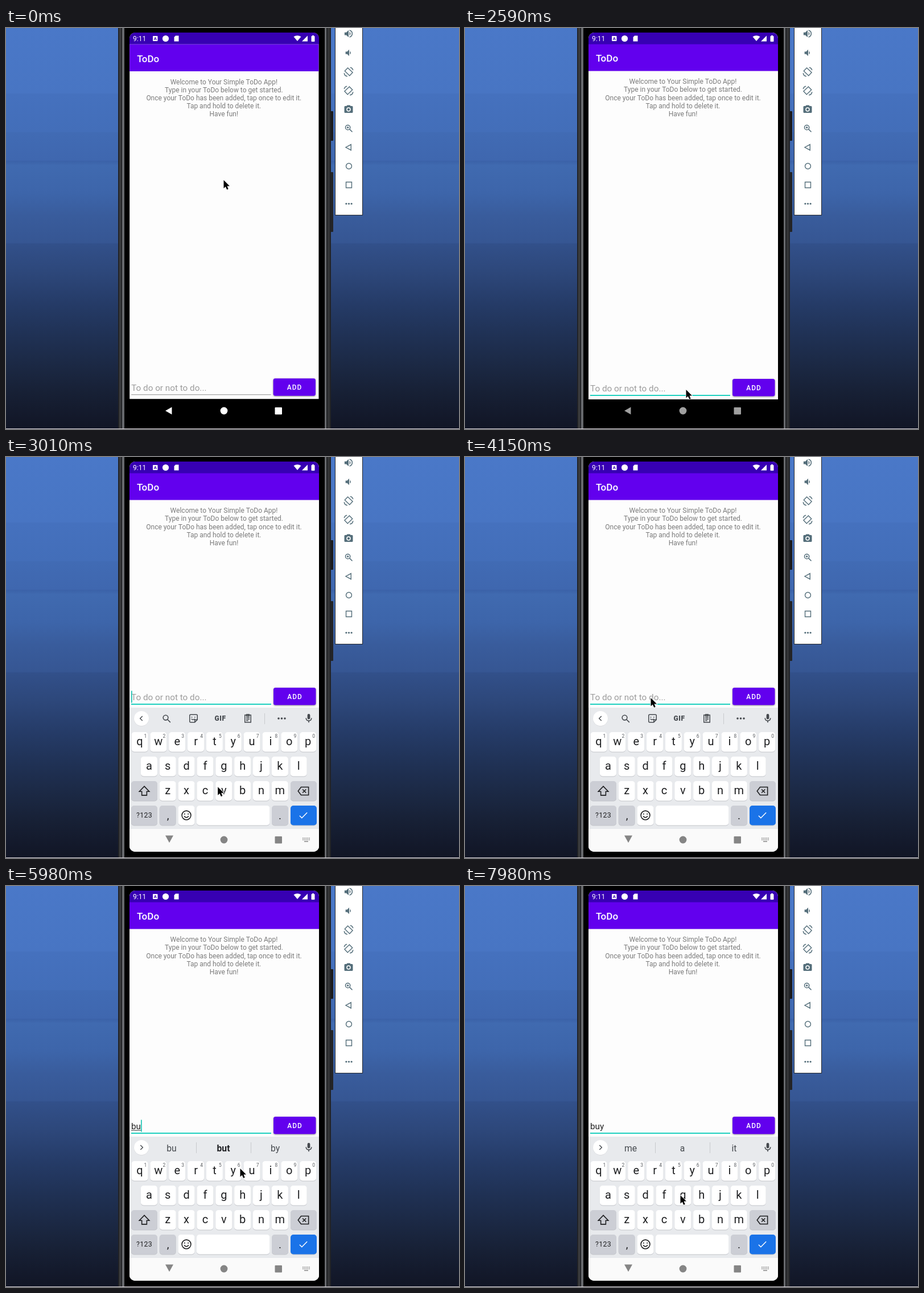
Recreate the animation shown at these times as an HTML page with a canvas. Size 796 by 704 pixels, loop 8000 ms.

```html
<!DOCTYPE html>
<html lang="en">
<head>
<meta charset="utf-8">
<title>ToDo app</title>
<style>
html, body { margin: 0; width: 100%; height: 100%; overflow: hidden; background: #111626 }
canvas { display: block }
</style>
</head>
<body>
<canvas id="stage" width="796" height="704"></canvas>
<script>
const ctx = document.getElementById('stage').getContext('2d');
const LOOP = 8000;

const bursts = [
  [120, 270, 2], [540, 1230, 5], [1380, 1500, 2], [1650, 2190, 5], [2590, 2860, 3],
  [3010, 3430, 4], [3720, 3720, 1], [4150, 4150, 1], [4420, 5410, 8], [5560, 5980, 4],
  [6130, 6550, 4], [6670, 7120, 4], [7380, 7680, 3], [7830, 7980, 2]
];
// Pointer tip: [time, x, y]
const pointer = [
  [270, 382, 266], [1230, 373, 366], [1500, 368, 486], [2190, 388, 634], [2860, 388, 634],
  [3430, 326, 422], [4280, 326, 422], [5130, 411, 588], [5410, 411, 574], [5840, 424, 500],
  [5980, 411, 495], [6130, 400, 494], [6550, 400, 496], [7120, 415, 631], [7380, 414, 630],
  [7680, 384, 560], [7980, 378, 542]
];
// Typing: [time, text, suggestions, word still being composed, autocorrect shown]
const typing = [
  [2650, ''],
  [5260, 'b', ['b', 'but', 'by'], true, true],
  [5840, 'bu', ['bu', 'but', 'by'], true, true],
  [6400, 'buy', ['buy', 'but', 'buying'], true],
  [7380, 'buy ', ['me', 'a', 'it']]
];
const sky = [
  [0, '#4a78c8'], [114, '#4875c3'], [116, '#4571be'], [182, '#436eb9'], [184, '#416bb4'],
  [232, '#3f67af'], [234, '#3b62a8'], [241, '#406ab0'], [290, '#3d65aa'], [330, '#395c9c'],
  [377, '#365693'], [379, '#32508a'], [430, '#2d477a'], [485, '#253b67'], [535, '#203256'],
  [595, '#1b2843'], [640, '#172035'], [704, '#111525']
];

function burstTime(t) {
  let now = 0;
  for (const [a, b, n] of bursts) {
    if (t < a) break;
    const gap = (b - a) / (n - 1);
    now = t >= b ? b : a + Math.floor((t - a) / gap) * gap;
  }
  return now;
}

// Interpolates rows of [time, ...values]
function at(rows, t) {
  const i = rows.findIndex(r => r[0] >= t);
  if (i < 0) return rows[rows.length - 1].slice(1);
  if (i === 0) return rows[0].slice(1);
  const a = rows[i - 1], b = rows[i], p = (t - a[0]) / (b[0] - a[0]);
  return a.slice(1).map((v, k) => v + (b[k + 1] - v) * p);
}

function rect(x, y, w, h, color, r = 0) {
  ctx.fillStyle = color;
  ctx.beginPath();
  ctx.roundRect(x, y, w, h, r);
  ctx.fill();
}

function disc(x, y, r, color) {
  ctx.fillStyle = color;
  ctx.beginPath();
  ctx.arc(x, y, r, 0, 7);
  ctx.fill();
}

function text(s, x, y, size, color, align = 'center', weight = 400, spacing = 0) {
  ctx.font = `${weight} ${size}px Roboto, sans-serif`;
  ctx.letterSpacing = spacing + 'px';
  ctx.textAlign = align;
  ctx.fillStyle = color;
  ctx.fillText(s, x, y);
}

// Path drawn in a 24-unit box centred on x, y; filled unless a line width is given
function icon(d, x, y, size, color, line) {
  const path = new Path2D(d);
  ctx.save();
  ctx.translate(x - size / 2, y - size / 2);
  ctx.scale(size / 24, size / 24);
  ctx.fillStyle = ctx.strokeStyle = color;
  ctx.lineWidth = line;
  if (line) ctx.stroke(path);
  else ctx.fill(path, 'evenodd');
  ctx.restore();
}

const LENS = 'M15 9.5A5.5 5.5 0 1 1 4 9.5A5.5 5.5 0 1 1 15 9.5M13.5 13.5L20 20';
const SPEAKER = 'M3 9v6h4l5 5V4L7 9z';
const WAVE = 'M14 8c3 1.4 3 6.6 0 8z';
const ROTATE = 'M10 2L22 13.5L14.5 21.5L2.5 10zM1 15a9 9 0 0 0 8 8M16 1a9 9 0 0 1 7 7';
const CAMERA = 'M9 2L7 4H4a2 2 0 0 0-2 2v12a2 2 0 0 0 2 2h16a2 2 0 0 0 2-2V6a2 2 0 0 0-2-2h-3L15 2z' +
  'M17 12A5 5 0 1 1 7 12A5 5 0 1 1 17 12M15 12A3 3 0 1 0 9 12A3 3 0 1 0 15 12';
const SMILE = 'M22 12A10 10 0 1 1 2 12A10 10 0 1 1 22 12M7 14q5 6 10 0M8 8v2.5M16 8v2.5';
const STICKER = 'M5 3h14a2 2 0 0 1 2 2v10l-6 6H5a2 2 0 0 1-2-2V5a2 2 0 0 1 2-2M21 15h-6v6M8 8v2M15 8v2M7 13q4 4 8 0';
const CLIPBOARD = 'M5 4h14v17H5zM9 2.5h6v4H9zM8 10h8M8 13.5h8M8 17h5';
const MIC = 'M12 2a3 3 0 0 1 3 3v6a3 3 0 0 1-6 0V5a3 3 0 0 1 3-3zM5 11h2a5 5 0 0 0 10 0h2a7 7 0 0 1-6 7v3h-2v-3a7 7 0 0 1-6-7z';
const SHIFT = 'M12 3L22 13.5H17V21H7V13.5H2z';
const ERASE = 'M8 4H23V20H8L2 12zM11 8.5L18 15.5M18 8.5L11 15.5';

function dots(x, y, r, gap, color) {
  for (let i = -1; i < 2; i++) disc(x + i * gap, y, r, color);
}

function drawDesktop() {
  const fill = ctx.createLinearGradient(0, 0, 0, 704);
  for (const [y, c] of sky) fill.addColorStop(y / 704, c);
  rect(0, 0, 796, 704, fill);

  rect(570, 146, 5, 52, '#1b1b1d', 1);
  rect(570, 253, 5, 105, '#242426', 1);
  rect(197, 0, 374, 704, '#222326');
  rect(199, 0, 3, 704, '#3c3d3f');
  rect(204, 0, 4, 704, '#67696d');
  rect(208, 0, 352, 704, '#000');
  rect(560, 0, 3, 704, '#67696d');
  rect(565, 0, 4, 704, '#333436');

  rect(578, -2, 49, 331, '#26282c');
  rect(579, -2, 47, 330, '#fff');
  const c = '#546e7a';
  icon(SPEAKER + WAVE, 602, 10, 19, c);
  icon('M14 4.5c8 2 8 13 0 15', 602, 10, 19, c, 2);
  icon(SPEAKER + WAVE, 603, 43.5, 17, c);
  icon(ROTATE, 602, 77, 17, c, 2);
  ctx.save();
  ctx.translate(1204, 0);
  ctx.scale(-1, 1);
  icon(ROTATE, 602, 110, 17, c, 2);
  ctx.restore();
  icon(CAMERA, 602, 143, 18, c);
  icon(LENS + 'M9.5 7v5M7 9.5h5', 602.5, 176.5, 18, c, 2);
  icon('M18 5V19L5 12z', 602, 209.5, 17, c, 2);
  icon('M19 12A7 7 0 1 1 5 12A7 7 0 1 1 19 12', 602.5, 242.5, 17, c, 2);
  icon('M5 5h14v14H5z', 602.5, 275.5, 17, c, 2);
  dots(602.5, 308.5, 1.6, 4.6, c);
  rect(0, 703, 796, 1, '#d5cfd6');
}

function drawStatus() {
  rect(217, 8, 333, 20.5, '#3700b3');
  text('9:11', 223, 22.5, 12, '#fff', 'left');
  rect(258, 14, 8.5, 9, '#fff', 1);
  text('A', 262.2, 21.3, 7.5, '#3700b3', 'center', 700);
  disc(280.5, 18.5, 5.6, '#fff');
  icon('M9 2h11v20H4V7z', 299.5, 18.5, 12, '#fff');
  icon('M12 21L0 7Q12-1 24 7z', 512, 18, 13, '#fff');
  icon('M2 22H22V2z', 525, 18.5, 12, '#fff');
  rect(536.5, 14, 6, 10, '#fff', 1);
  rect(538, 13, 3, 2, '#fff');
}

function drawApp(now, entry, y) {
  const focused = now >= 2590;
  const scale = now < 120 ? 0.9978 : now < 270 ? 0.999 : 1;
  ctx.save();
  ctx.translate(300, 290);
  ctx.scale(scale, scale);
  ctx.translate(-300, -290);
  rect(217, 8, 333, y < 600 ? 685 : 644, '#fdfdfd');
  rect(217, 28, 333, 47.5, '#6200ee');
  text('ToDo', 230, 59, 17, '#fff', 'left', 500);
  ['Welcome to Your Simple ToDo App!', 'Type in your ToDo below to get started.',
    'Once your ToDo has been added, tap once to edit it.', 'Tap and hold to delete it.', 'Have fun!'
  ].forEach((s, i) => text(s, 383, 98.2 + i * 14.2, 12, '#7b7b7b'));

  const typed = entry ? entry[1] : '';
  text(typed || 'To do or not to do...', 220, y + 5.5, 15.3, typed ? '#222' : '#9c9c9c', 'left');
  const width = typed ? ctx.measureText(typed).width : 0;
  if (entry && entry[3]) rect(220, y + 7, width, 1, '#333');
  if (focused) rect(220, y + 11.5, 246, 2, '#1fd0bf');
  else rect(220, y + 11.5, 246, 1, '#8e8e8e');
  if (entry && (now - entry[0]) % 1000 < 500) rect(220 + width, y - 11, 1.7, 21, '#1cc4b4');

  ctx.save();
  ctx.shadowColor = '#0006';
  ctx.shadowBlur = 3;
  ctx.shadowOffsetY = 1;
  rect(470, y - 16.5, 74.5, 30.5, '#6200ee', 3.5);
  ctx.restore();
  text('ADD', 507.5, y + 3.5, 11.9, '#fff', 'center', 500, 1.06);
  ctx.restore();
}

function drawKey(x, y, w, color) {
  rect(x, y + 1, w, 34.5, '#c3c5ca', 5);
  rect(x, y, w, 34.5, color, 5);
}

function drawStrip(words, bold) {
  const c = '#45494e';
  disc(238, 459.5, 13.2, '#d6d8db');
  disc(238, 459, 13, '#fff');
  icon(words ? 'M9 5L16 12L9 19' : 'M15 5L8 12L15 19', 238, 459, 14, c, 2.4);
  icon(MIC, 532, 459, 19, c);
  if (words) {
    words.forEach((s, i) => {
      const strong = bold && i === 1;
      text(s, 291 + i * 91, 465.5, 15.7, strong ? '#202124' : c, 'center', strong ? 700 : 400);
    });
    rect(334, 450, 1, 19, '#c8cacd');
    rect(430, 450, 1, 19, '#c8cacd');
    return;
  }
  icon(LENS, 282.5, 459.5, 19, c, 2);
  icon(STICKER, 329.5, 459, 18, c, 2);
  text('GIF', 376.5, 463.3, 12, c, 'center', 800, 0.6);
  icon(CLIPBOARD, 425, 459, 18, c, 2);
  rect(454, 450, 1, 19, '#c8cacd');
  dots(484.5, 459, 1.8, 5.5, c);
}

function drawKeyboard(shift, entry) {
  const dark = '#ccced5', ink = '#1d1e20', step = 32.85;
  ctx.save();
  ctx.translate(0, shift);
  rect(217, 440, 333, 255, '#e8eaed');
  drawStrip(entry && entry[2], entry && entry[4]);
  [['qwertyuiop', 235], ['asdfghjkl', 251.4], ['zxcvbnm', 284.2]].forEach(([letters, x0], row) => {
    [...letters].forEach((s, i) => {
      const x = x0 + i * step, y = 483 + row * 43;
      drawKey(x - 14.5, y, 29, '#fff');
      text(s, x, y + 23, 20, ink);
      if (!row) text((i + 1) % 10, x + 10, y + 9.5, 8.5, '#5a5d61');
    });
  });
  drawKey(220, 569, 46, dark);
  icon(SHIFT, 243, 586, 21, ink, 1.8);
  drawKey(500, 569, 46, dark);
  icon(ERASE, 522, 586.5, 21, ink, 1.8);
  drawKey(220, 612, 46, dark);
  text('?123', 243, 633, 12.3, ink, 'center', 400, 0.4);
  drawKey(269.7, 612, 29, dark);
  text(',', 284.5, 636, 19, ink);
  drawKey(302.5, 612, 29, '#fff');
  icon(SMILE, 317, 629, 19, ink, 2);
  drawKey(335, 612, 128.5, '#fff');
  drawKey(467, 612, 29, dark);
  text('.', 481.5, 636, 19, ink);
  drawKey(500, 612, 46, '#1a73e8');
  icon('M2 13L8 19L22 5', 522.5, 629, 16, '#fff', 2.2);
  ctx.restore();
}

function drawNav(color, open, sliding) {
  if (open && !sliding) rect(217, 653, 333, 42, '#fafafa');
  if (open && !sliding) icon('M0 0H24L12 22z', 287, 671.5, 14, color);
  else icon('M22 0V24L1 12z', 286, 672, 13, color);
  disc(383, 672, 6.4, color);
  rect(472.5, 666, 12.5, 12.5, color, 1);
  if (!open) return;
  for (let i = 0; i < 10; i++) rect(521 + i % 5 * 2.8, 668.5 + (i > 4) * 2.7, 1.7, 1.5, color);
  rect(524, 674.2, 7, 1.6, color);
}

function drawPointer(x, y) {
  ctx.save();
  ctx.translate(x + 0.5, y + 1);
  const arrow = new Path2D('M0 0V14.5L3.3 11.5L5.7 16.8L8.2 15.7L6 10.6H10.5z');
  ctx.strokeStyle = '#fff';
  ctx.lineWidth = 1.6;
  ctx.stroke(arrow);
  ctx.fillStyle = '#000';
  ctx.fill(arrow);
  ctx.restore();
}

function draw(t) {
  const now = burstTime(t);
  const entry = typing.filter(e => e[0] <= now).pop();
  const open = now >= 2725;
  const [shift] = at([[2725, 130], [2860, 41], [3010, 0]], now);
  const [grey] = at([[700, 255], [1230, 160]], now);

  drawDesktop();
  ctx.save();
  ctx.beginPath();
  ctx.roundRect(217, 8, 333, 685, 10);
  ctx.clip();
  drawApp(now, entry, open ? 421.5 : 632.5);
  drawStatus();
  if (open) drawKeyboard(shift, entry);
  drawNav(!open ? `rgb(${grey},${grey},${grey})` : shift ? '#7779' : '#858585', open, shift > 0);
  ctx.restore();
  drawPointer(...at(pointer, now));
}

function loop() {
  draw(performance.now() % LOOP);
  requestAnimationFrame(loop);
}
loop();
</script>
</body>
</html>
```
